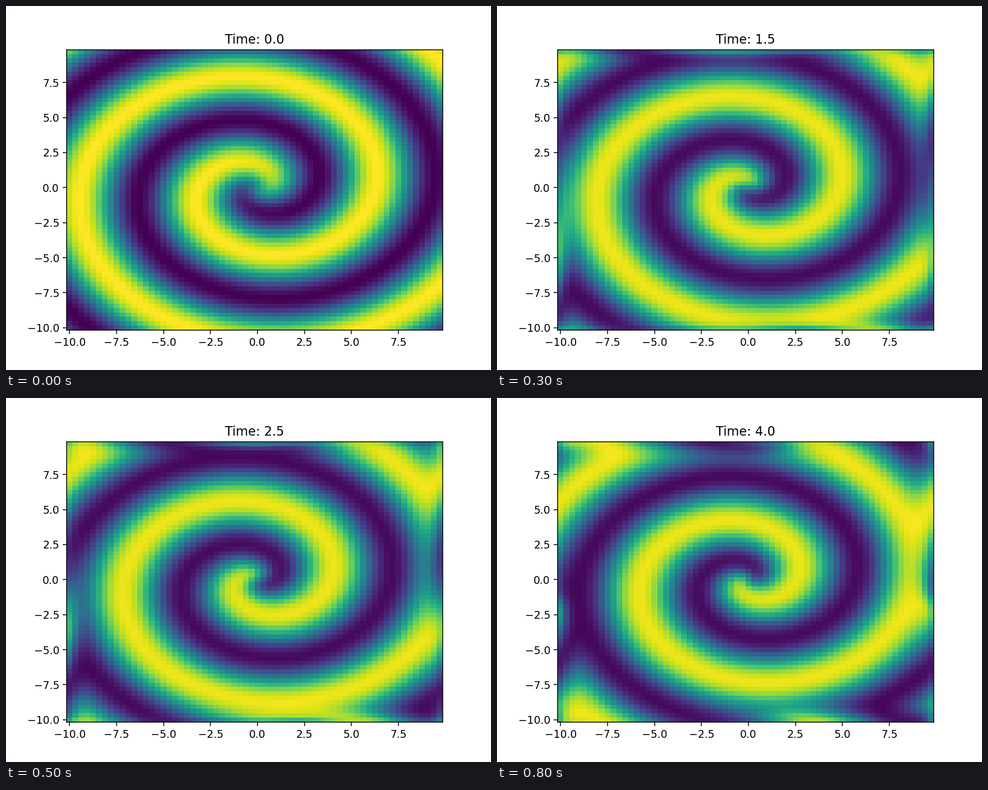
A matplotlib script that plays this animation: 864x648 px, repeating every 0.9 s.

```python
import numpy as np
import matplotlib.pyplot as plt
from matplotlib.animation import FuncAnimation

# Lambda-omega reaction-diffusion on a periodic square, z = u + iv
N, SIZE = 64, 20.0
DIFF, BETA = 0.1, 1.0
FRAMES, STEP, SUBSTEPS = 9, 0.5, 20

x = np.linspace(-SIZE / 2, SIZE / 2, N, endpoint=False)
X, Y = np.meshgrid(x, x)
k = 2 * np.pi * np.fft.fftfreq(N, SIZE / N)
KX, KY = np.meshgrid(k, k)
K2 = KX**2 + KY**2


def rate(z):
    amp = np.abs(z) ** 2
    lap = np.fft.ifft2(-K2 * np.fft.fft2(z))
    return (1 - amp - 1j * BETA * amp) * z + DIFF * lap


def rk4(z, dt):
    a = rate(z)
    b = rate(z + dt / 2 * a)
    c = rate(z + dt / 2 * b)
    d = rate(z + dt * c)
    return z + dt / 6 * (a + 2 * b + 2 * c + d)


def solve():
    r = np.hypot(X, Y)
    z = np.tanh(r) * np.exp(1j * (np.arctan2(Y, X) - r))
    states = [z.real]
    for _ in range(FRAMES - 1):
        for _ in range(SUBSTEPS):
            z = rk4(z, STEP / SUBSTEPS)
        states.append(z.real)
    return states


states = solve()
fig, ax = plt.subplots(figsize=(6.4, 4.8), dpi=135)
mesh = ax.pcolormesh(X, Y, states[0], shading="nearest", cmap="viridis")
title = ax.set_title("Time: 0.0")


def update(i):
    mesh.set_array(states[i])
    title.set_text(f"Time: {i * STEP:.1f}")
    return mesh, title


anim = FuncAnimation(fig, update, frames=FRAMES, interval=100,
                     repeat=True, repeat_delay=0, blit=False)
plt.show()
```
